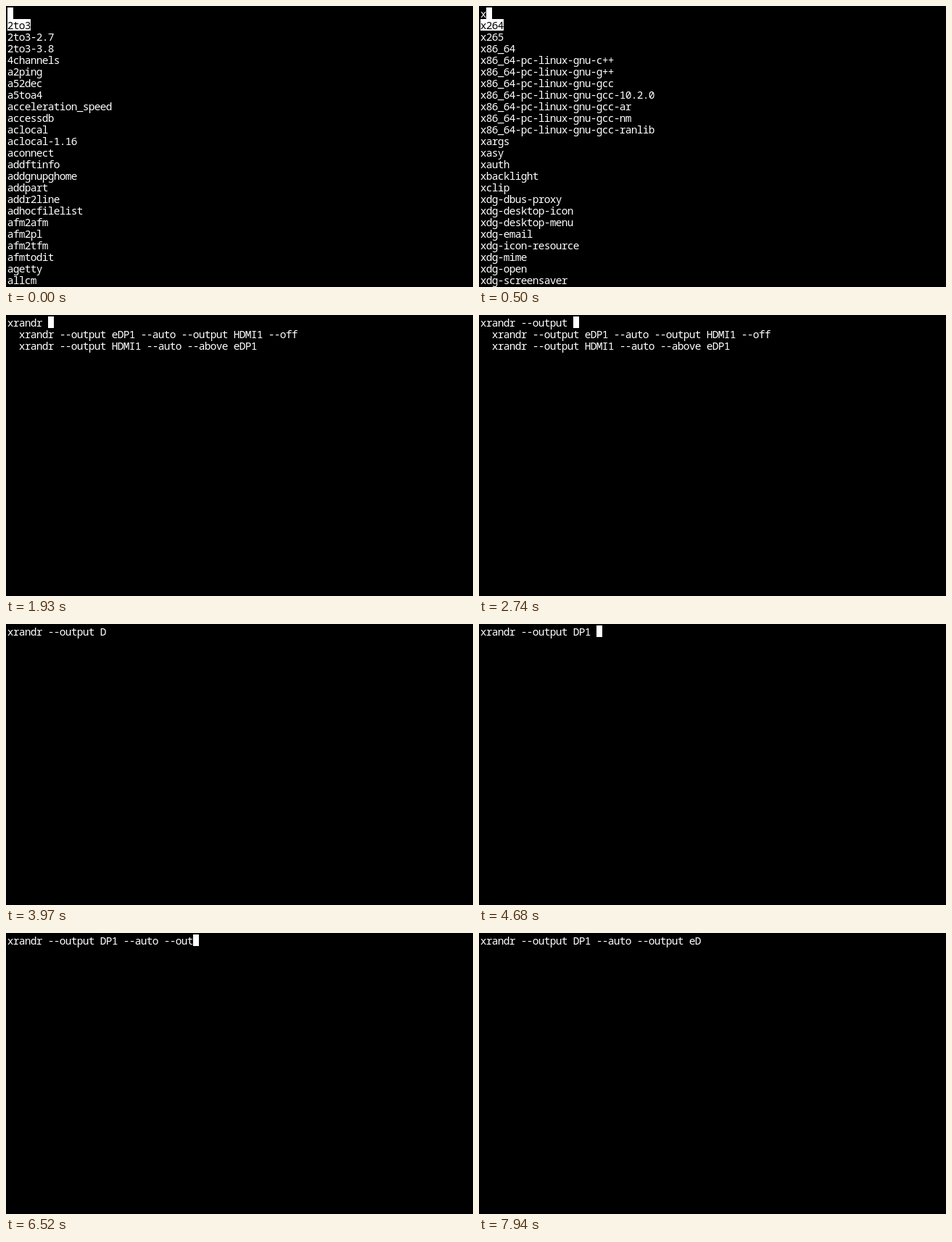
Recreate the animation shown at these times as an HTML page. Size 644x388 px, loop 8 s.

```html
<!DOCTYPE html>
<html lang="en">
<head>
<meta charset="utf-8">
<title>Command menu</title>
<style>
  html, body { margin: 0; width: 100%; height: 100%; overflow: hidden; background: #000; }
  svg { display: block; width: 644px; height: 388px; }
  text {
    font: 300 14.5px "Noto Sans Mono", "DejaVu Sans Mono", monospace;
    letter-spacing: calc(8px - .6em);
    font-variant-ligatures: none;
    white-space: pre;
    fill: #fff;
  }
  rect { fill: #fff; }
  text.picked { fill: #000; }
</style>
</head>
<body>
<svg id="screen" viewBox="0 0 644 388"></svg>
<script>
const LOOP = 8000, TICK = 101.85;
const CELL_W = 8, CELL_H = 16, PAD = 2, BASELINE = 14, ROWS = 23;

const words = s => s.trim().split(/\s+/);

const commands = [
  ...words(`2to3 2to3-2.7 2to3-3.8 4channels a2ping a52dec a5toa4
    acceleration_speed accessdb aclocal aclocal-1.16 aconnect addftinfo
    addgnupghome addpart addr2line adhocfilelist afm2afm afm2pl afm2tfm
    afmtodit agetty allcm x264 x265 x86_64`),
  ...words('c++ g++ gcc gcc-10.2.0 gcc-ar gcc-nm gcc-ranlib')
    .map(tool => 'x86_64-pc-linux-gnu-' + tool),
  ...words(`xargs xasy xauth xbacklight xclip xdg-dbus-proxy xdg-desktop-icon
    xdg-desktop-menu xdg-email xdg-icon-resource xdg-mime xdg-open
    xdg-screensaver xrandr xrdb xrefresh`)
];
const history = [
  '  xrandr --output eDP1 --auto --output HDMI1 --off',
  '  xrandr --output HDMI1 --auto --above eDP1'
];

// Bursts of typing: first tick, keys, ticks taken
const bursts = [
  [5, 'x'], [7, 'ra', 2], [10, 'n'], [14, 'dr'], [19, ' '],
  [21, '--out', 4], [27, 'put '], [39, 'D'], [41, 'P'], [43, '1'], [46, ' '],
  [49, '-'], [51, '-au', 3], [55, 'to ', 3], [60, '--ou', 3], [64, 'tp', 2],
  [67, 'ut', 2], [71, ' '], [74, 'e'], [77, 'D']
];
// Ticks at which the screen is cleared but not yet filled again
const redraws = [8, 39, 71, 78];

const screen = document.getElementById('screen');

function add(tag, attrs, content = '') {
  const el = document.createElementNS(screen.namespaceURI, tag);
  for (const key in attrs) el.setAttribute(key, attrs[key]);
  el.textContent = content;
  screen.append(el);
}

function block(col, row, width) {
  add('rect', { x: PAD + col * CELL_W, y: PAD + row * CELL_H, width: width * CELL_W, height: CELL_H });
}

function print(str, row, picked) {
  const body = str.trimStart();
  const col = str.length - body.length;
  if (picked) block(0, row, str.length);
  add('text', {
    x: PAD + col * CELL_W - 0.3,
    y: PAD + row * CELL_H + BASELINE,
    class: picked ? 'picked' : 'plain'
  }, body);
}

function typedAt(tick) {
  return bursts.map(([first, keys, span = 1]) => {
    const part = Math.min(1, Math.max(0, (tick - first + 1) / span));
    return keys.slice(0, Math.round(keys.length * part));
  }).join('');
}

function draw(tick) {
  const typed = typedAt(tick);
  screen.replaceChildren();
  print(typed, 0);
  if (redraws.includes(tick)) return;
  block(typed.length, 0, 1);
  const found = commands.filter(c => c.startsWith(typed));
  const past = history.filter(h => h.includes(typed));
  [...found, ...past].slice(0, ROWS)
    .forEach((item, i) => print(item, i + 1, i === 0 && found.length > 0));
}

let shown;
const start = performance.now();

function frame() {
  const t = (performance.now() - start) % LOOP;
  // Ticks begin on whole hundredths of a second
  const tick = Math.floor((t + 9.9) / TICK);
  if (tick !== shown) draw(shown = tick);
  requestAnimationFrame(frame);
}
frame();
</script>
</body>
</html>
```
